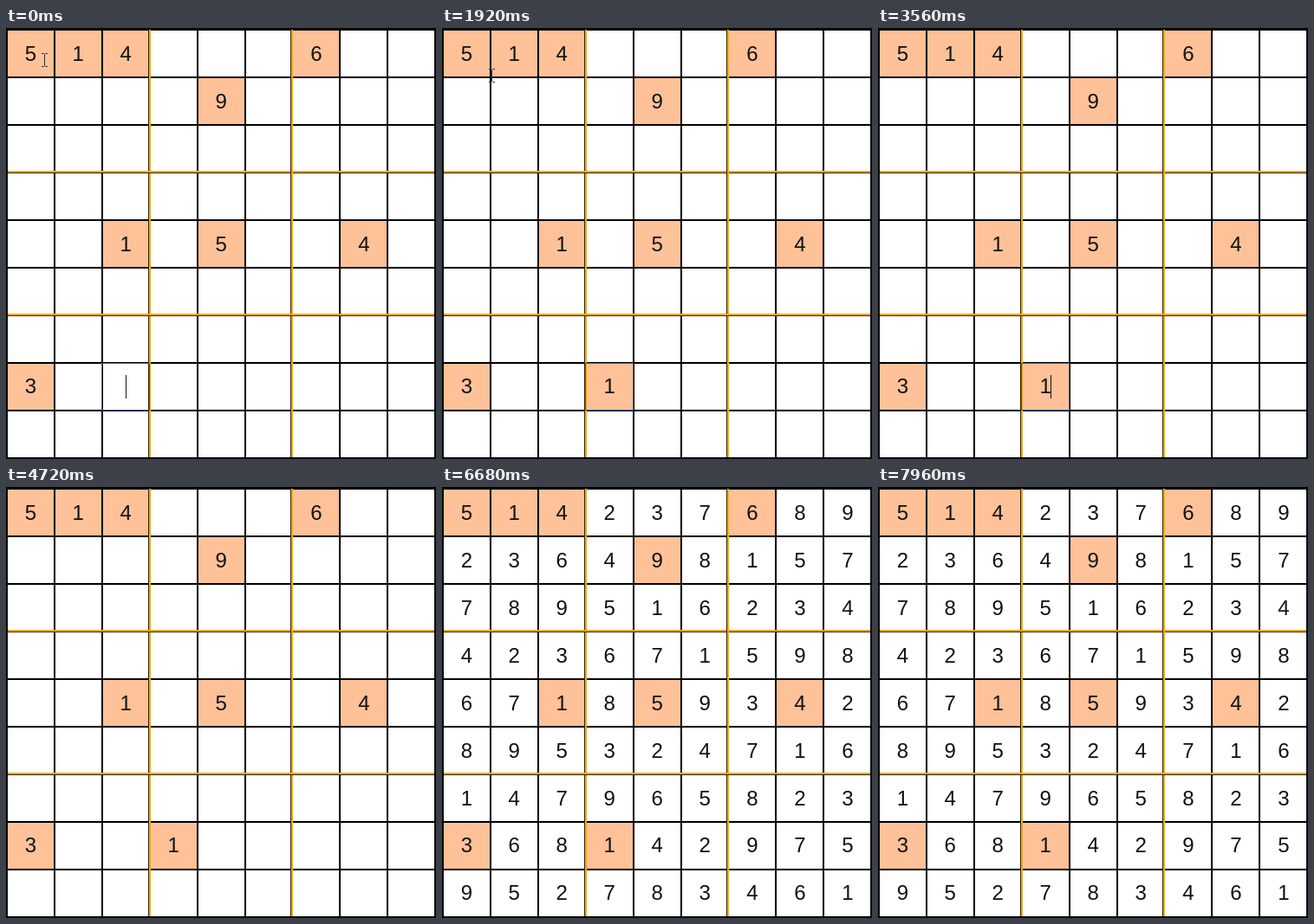
An HTML page with a canvas that plays this animation: 496 by 498 pixels, repeating every 8000 ms.

```html
<!DOCTYPE html>
<html lang="en">
<head>
<meta charset="utf-8">
<title>Sudoku</title>
<style>
  html, body { margin: 0; width: 100%; height: 100%; overflow: hidden; background: #fff; }
  canvas { display: block; }
</style>
</head>
<body>
<canvas width="496" height="498"></canvas>
<script>
const ctx = document.querySelector('canvas').getContext('2d');
const LOOP = 8000, TAB = 560, TYPE = 1080, BLUR = 4160, SOLVE = 5000;
const solution = ['514237689', '236498157', '789516234', '423671598', '671859342',
                  '895324716', '147965823', '368142975', '952783461'];
const givens = ['00', '01', '02', '06', '14', '42', '44', '47', '70'];
// Pointer stops: time, x, y
const path = [[1800, 45, 37], [2560, 229, 303], [3240, 252, 520]];
const lineX = i => Math.round(54.9 * i);
const lineY = i => 1 + 55 * i;

function rect(color, x, y, w, h) {
  ctx.fillStyle = color;
  ctx.fillRect(x, y, w, h);
}

function drawCells(t) {
  ctx.font = '24px Arial, "Liberation Sans", sans-serif';
  ctx.textAlign = 'center';
  for (let r = 0; r < 9; r++) {
    for (let c = 0; c < 9; c++) {
      const filled = givens.includes('' + r + c) || (r === 7 && c === 3 && t >= TYPE);
      if (filled) rect('#fec198', lineX(c), lineY(r), 56, 56);
      if (filled || t >= SOLVE) {
        ctx.fillStyle = '#111';
        ctx.fillText(solution[r][c], 28.3 + 54.95 * c, 38.4 + 54.85 * r);
      }
    }
  }
}

function drawGrid() {
  for (let i = 0; i < 10; i++) {
    rect('#000', lineX(i), 0, 2, 498);
    rect('#000', 0, lineY(i), 496, 2);
  }
  rect('#000', 0, 0, 496, 2);
  for (const i of [3, 6]) {
    rect('#33250a', lineX(i) - 1, 2, 1, 494);
    rect('#eeaa18', lineX(i), 2, 2, 494);
    rect('#eeaa18', 2, lineY(i) - 1, 492, 2);
    rect('#33250a', 2, lineY(i) + 1, 492, 1);
  }
}

function drawFocus(t) {
  if (t >= BLUR) return;
  const col = t < TAB ? 2 : 3;
  ctx.strokeStyle = '#3d5f9c';
  ctx.lineWidth = 1;
  ctx.strokeRect(lineX(col) + 0.5, 387.5, 55, 54);
  const since = t - (t < TAB ? 0 : t < TYPE ? TAB : TYPE);
  if (since % 1000 < 500) {
    const x = t < TAB ? 138 : t < TYPE ? 193 : 199;
    rect('#111', x, 401, 1, 27);
  }
}

function drawPointer(t) {
  if (t >= path[2][0]) return;
  const k = t < path[1][0] ? 0 : 1;
  const [t0, x0, y0] = path[k], [t1, x1, y1] = path[k + 1];
  let p = Math.max(0, (t - t0) / (t1 - t0));
  p = p * p * (3 - 2 * p);
  ctx.save();
  ctx.translate(Math.round(x0 + (x1 - x0) * p) - 0.5, Math.round(y0 + (y1 - y0) * p));
  ctx.strokeStyle = '#333';
  ctx.lineWidth = 1;
  ctx.beginPath();
  for (const s of [-1, 1]) {
    ctx.moveTo(-3.5, 7.5 * s);
    ctx.lineTo(-1, 7.5 * s);
    ctx.lineTo(0, 6.5 * s);
    ctx.lineTo(1, 7.5 * s);
    ctx.lineTo(3.5, 7.5 * s);
  }
  ctx.moveTo(0, -6.5);
  ctx.lineTo(0, 6.5);
  ctx.stroke();
  ctx.restore();
}

function frame() {
  const t = performance.now() % LOOP;
  rect('#fff', 0, 0, 496, 498);
  drawCells(t);
  drawGrid();
  drawFocus(t);
  drawPointer(t);
  requestAnimationFrame(frame);
}
frame();
</script>
</body>
</html>
```
